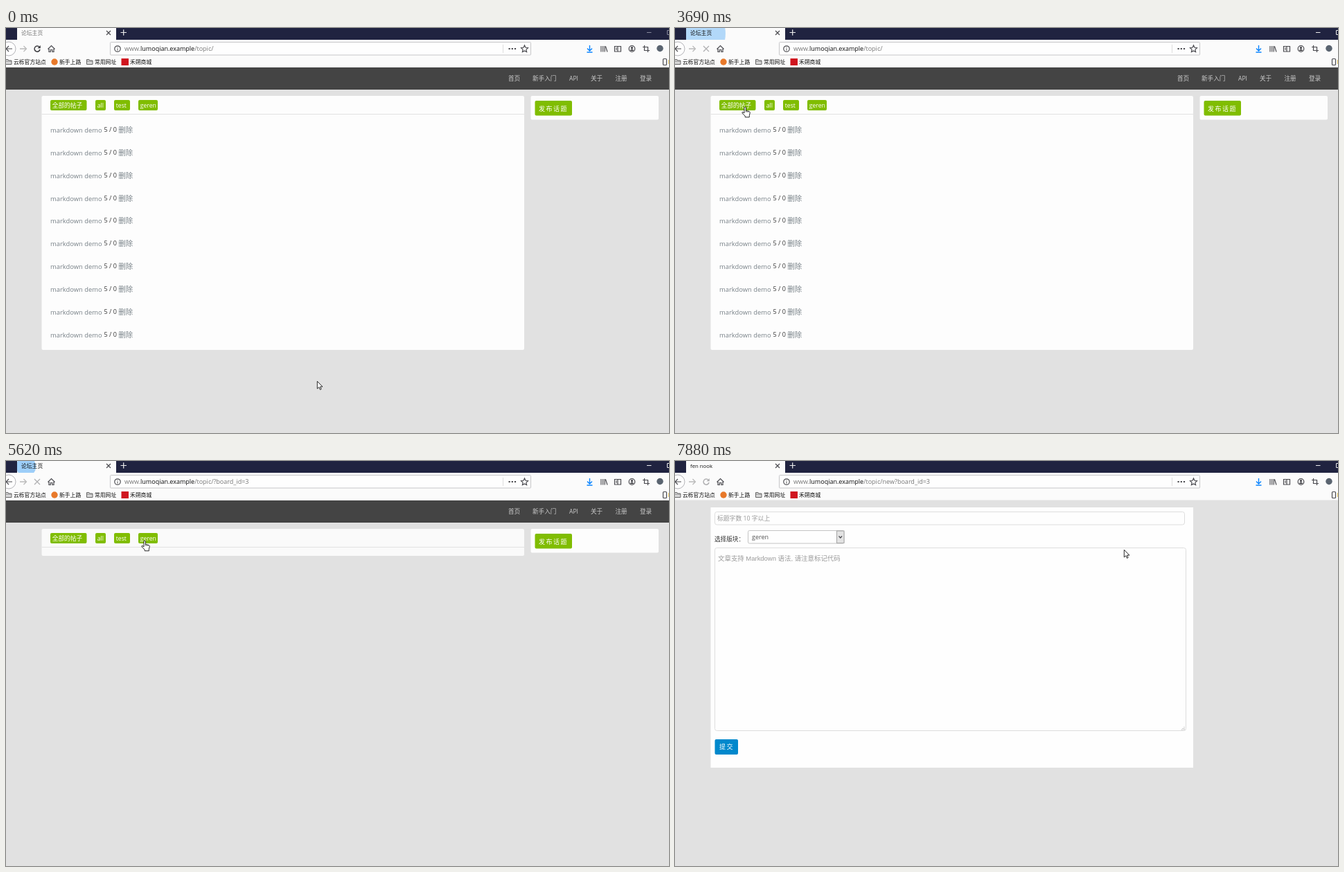
Recreate the animation shown at these times as an HTML page. Size 957 px wide and 585 px high, loop 8 s.

```html
<!DOCTYPE html>
<html lang="zh">
<head>
<meta charset="utf-8">
<title>论坛主页</title>
<style>
html, body { margin: 0; width: 100%; height: 100%; overflow: hidden; background: #e1e1e1; }
svg { display: block; width: 100vw; height: 100vh; }
text { font-family: "Open Sans", "Noto Sans CJK SC", "Noto Sans CJK", sans-serif; white-space: pre; }
.ui { font-size: 7.8px; fill: #111; }
.url { font-size: 9px; fill: #777; }
.url .host { fill: #0c0c0d; }
.nav { font-size: 8.6px; fill: #ccc; }
.tag { font-size: 8.7px; fill: #fff; }
.btn { font-size: 9px; font-weight: 500; fill: #fff; letter-spacing: 1.5px; }
.post { font-size: 9.4px; fill: #778087; }
.post .count { font-size: 9px; fill: #333; }
.post .del { font-size: 10.4px; }
.hint { fill: #999; font-size: 8.8px; }
.area { font-family: "Liberation Sans", "Noto Sans CJK SC", "Noto Sans CJK", sans-serif; font-size: 9.45px; }
.line { fill: none; stroke: #4a4a4f; stroke-width: 1.2; }
.field { fill: #fefefe; stroke: #ddd; }
</style>
</head>
<body>
<svg viewBox="0 0 957 585" preserveAspectRatio="none">
  <defs>
    <clipPath id="tabClip"><rect x="16" width="143" height="17"/></clipPath>
    <g id="folder">
      <path d="M.5 8.5v-7h3.5l1 1.5h4v5.5z" fill="#d8d8d8" stroke="#666"/>
      <path d="M1 4h8" stroke="#777" stroke-width=".8"/>
    </g>
  </defs>

  <rect width="957" height="585" fill="#e1e1e1"/>

  <g id="forum">
    <rect y="57" width="957" height="32" fill="#444"/>
    <g id="nav" class="nav"></g>
    <rect id="panel" x="51.5" y="98" width="696.5" height="367" rx="2" fill="#fdfdfd"/>
    <path d="M51.5 124.5h696.5" stroke="#e2e2e2"/>
    <g id="tags"></g>
    <g id="posts"></g>
    <path id="rulesRight" stroke="#f0f0f0"/>
    <path id="rulesLeft" stroke="#f0f0f0"/>
    <rect x="757.5" y="98" width="184.5" height="34.5" rx="2" fill="#fdfdfd"/>
    <rect id="newTopic" x="763.5" y="105" width="53.5" height="21.5" rx="2"/>
    <text class="btn" x="769" y="119.5">发布话题</text>
  </g>

  <g id="editor">
    <rect x="51.5" y="67" width="696.5" height="376" fill="#fefefe"/>
    <rect class="field" x="57.5" y="73.5" width="678" height="18.5" rx="3"/>
    <text class="hint" x="61" y="86">标题字数 10 字以上</text>
    <text x="57" y="115.5" font-size="8.6" fill="#333">选择版块：</text>
    <rect x="105.5" y="100.5" width="138.5" height="18.5" rx="2" fill="#fefefe" stroke="#c4c4c4"/>
    <text x="111" y="113" font-size="9" fill="#555">geren</text>
    <rect x="233.5" y="101" width="10.5" height="17.5" fill="#e3e3e3" stroke="#a5a5a5"/>
    <path d="M236.5 108.5l2.3 2.5 2.3-2.5" class="line" stroke-width="1"/>
    <rect class="field" x="57.5" y="125.5" width="680" height="264" rx="3"/>
    <text class="hint area" x="62" y="143.5">文章支持 Markdown 语法, 请注意标记代码</text>
    <path d="M735 384v4M733 386v2M731 388h5" stroke="#aaa" stroke-dasharray="1 1"/>
    <rect x="57.5" y="402" width="33.5" height="22" rx="2" fill="#08c"/>
    <text class="btn" x="64" y="416.3">提交</text>
  </g>

  <g id="status">
    <rect y="580" width="158" height="5" fill="#fafafa"/>
    <text x="-9" y="588.5" font-size="8.5" fill="#444">等待 www.lumoqian.example…</text>
  </g>

  <rect width="957" height="17" fill="#202340"/>
  <rect x="16" width="143" height="17" fill="#fbfbfb"/>
  <g clip-path="url(#tabClip)"><circle id="burst" cx="29" cy="8" fill="#9dcef9"/></g>
  <circle id="dot" cy="7" r="1.2" fill="#222"/>
  <text id="title" class="ui" y="9.8"></text>
  <path d="M145 4l6 6m0-6l-6 6" class="line"/>
  <path d="M165.5 6.5h8.5M169.7 2.3v8.5" stroke="#eee" stroke-width="1.2"/>
  <path id="winButtons" d="M925 6.5h6.5M957 3.5h-2.5v6h2.5" fill="none"/>

  <rect y="17" width="957" height="40" fill="#fbfbfb"/>
  <path d="M0 56.5h957" stroke="#eee"/>
  <circle cx="4" cy="30" r="10" fill="#fefefe" stroke="#b4b4b8"/>
  <path d="M9 30H0M4 26l-4 4 4 4" class="line" stroke-width="1.6"/>
  <path d="M20 30h9.5M25.5 26l4 4-4 4" fill="none" stroke="#bbb" stroke-width="1.3"/>
  <path id="stop" d="M41 26l8 8m0-8l-8 8" fill="none" stroke-width="1.3"/>
  <g id="reload">
    <path d="M48.2 27.6A4 4 0 1 0 49 31" fill="none" stroke-width="1.5"/>
    <path d="M49.8 25v4.3h-4.3z" stroke="none"/>
  </g>
  <path d="M60.5 30.5l5-5 5 5M62 30v4.5h2.3v-3h2.5v3H69V30" class="line" stroke-width="1.4"/>
  <rect x="150.5" y="20.5" width="607" height="18.5" rx="1" fill="#fefefe" stroke="#c6c6c8"/>
  <circle cx="161" cy="30" r="4.2" class="line" stroke-width=".9"/>
  <path d="M161 29.5v3M161 27.5v1" stroke="#555"/>
  <text class="url" x="171" y="33.2">www.<tspan class="host">lumoqian.example</tspan><tspan id="path"></tspan></text>
  <path d="M717.5 24v12" stroke="#ddd"/>
  <path d="M725.5 30h2.2m2 0h2.2m2 0h2.2" stroke="#4a4a4f" stroke-width="2.2"/>
  <path d="M748.500 25l1.500 3.300 3.500.4-2.600 2.400.7 3.500-3.100-1.700-3.100 1.700.7-3.500-2.600-2.400 3.500-.4z" class="line" stroke-width="1"/>

  <path d="M842.500 25v7M839 29.500l3.500 3.500 3.500-3.500M838.500 35h8" fill="none" stroke="#0a84ff" stroke-width="1.400"/>
  <path d="M859 26v8.500M861.700 26v8.500M864.300 26v8.500M865.500 26.500l2.500 8" class="line"/>
  <path d="M878.500 26.500h9v7.500h-9zM883 26.500v7.500M880 29h2M880 31h2" class="line"/>
  <circle cx="903.500" cy="30" r="4.300" class="line" stroke-width="1"/>
  <path d="M901 33a2.500 2.300 0 0 1 5 0z" fill="#4a4a4f"/><circle cx="903.500" cy="28.700" r="1.700" fill="#4a4a4f"/>
  <path d="M921.500 25v7.500h7.500M919 27.500h7.500V35" class="line" stroke-width="1.500"/>
  <circle cx="944" cy="29.500" r="4.700" fill="#5a6470"/>

  <use href="#folder" x="-1" y="44"/>
  <use href="#folder" x="116" y="44"/>
  <circle cx="70" cy="49" r="4.700" fill="#e8792a"/>
  <rect x="166.500" y="44" width="10.500" height="10" fill="#d0151f"/>
  <g id="marks" class="ui"></g>
  <rect x="948.500" y="44.500" width="5" height="9" rx="1" class="line" stroke-width="1"/>
  <path d="M956.500 46v6" stroke="#e8c860"/>

  <g id="cursor" stroke="#111" stroke-width=".9" stroke-linejoin="round" fill="#fff">
    <path id="arrow" d="M.3.3v10.700l2.500-2.200 1.600 3.600 1.700-.8-1.600-3.500h3.400z"/>
    <g id="hand">
      <path d="M-1 1.300a1.200 1.200 0 0 1 2.400 0v4.200l1.800.3 1.800.4 1.500.6q.9.600.7 2l-.9 3.700v2.300H.2v-1.700L-3.800 9q-.9-1.400.5-1.700l2.300 1.500z"/>
      <path d="M1.400 5.500v2M3.200 5.800v2M5 6.200v1.600" stroke-width=".6"/>
    </g>
  </g>
</svg>

<script>
const $ = id => document.getElementById(id);
const LOOP = 8000;
const FRAME = 134;

const label = (cls, x, y, s) => `<text class="${cls}" x="${x}" y="${y}">${s}</text>`;
const show = (id, on) => { $(id).style.display = on ? '' : 'none'; };

const tags = [['全部的帖子', 64, 52.5], ['all', 129, 15], ['test', 156, 23], ['geren', 191, 28]];
$('tags').innerHTML = tags.map(([s, x, w]) =>
  `<rect x="${x}" y="104" width="${w}" height="15" rx="2" fill="#80bd01"/>` + label('tag', x + 2.7, 115, s)).join('');

$('nav').innerHTML = [['首页', 725], ['新手入门', 760], ['API', 813], ['关于', 844], ['注册', 879.5], ['登录', 915]]
  .map(([s, x]) => label('nav', x, 76.3, s)).join('');

$('marks').innerHTML = [['云栎官方站点', 11], ['新手上路', 77], ['常用网址', 128], ['禾朔商城', 179]]
  .map(([s, x]) => label('ui', x, 52, s)).join('');

const rowY = i => 147 + i * 32.85;
$('posts').innerHTML = Array.from({ length: 10 }, (_, i) => {
  const y = rowY(i);
  return label('post', 64, y + 4, 'markdown demo') +
    `<g class="post"><text class="count" x="141.500" y="${y + 3}">5 / 0</text>` +
    `<text class="del" x="162.300" y="${y + 4}">删除</text></g>`;
}).join('');

const rules = (from, to, x, w) => {
  let d = '';
  for (let i = from; i < to; i++) d += `M${x} ${Math.floor(rowY(i) + 16) + .5}h${w}`;
  return d;
};
$('rulesLeft').setAttribute('d', rules(0, 5, 184, 61));
$('rulesRight').setAttribute('d', rules(5, 9, 238, 102));

// Pointer runs: start time, then one position per frame step
const runs = [
  [0, [449, 510]],
  [280, [415, 455], [332, 415], [238, 303], [180, 153], [166, 136], [160, 129], [157, 125], [156, 124]],
  [1340, [144, 115], [136, 111]],
  [2430, [132, 111], [122, 112], [110, 113], [101, 114]],
  [3820, [112, 115], [136, 117], [154, 118], [161, 117]],
  [4760, [166, 117], [180, 116], [194, 115], [200, 115]],
  [5750, [222, 118], [305, 122], [440, 127], [590, 130], [710, 131], [780, 131], [797, 131]],
  [6710, [789, 115]],
  [7760, [747, 128]],
  [7880, [648, 128]]
];

function pointer(t) {
  const [start, ...steps] = runs.filter(r => r[0] <= t).pop();
  return steps[Math.min(steps.length - 1, Math.floor((t - start + 1) / FRAME))];
}

// Page loads: request, address change, paint, length of the tab burst
const home = '论坛主页';
const loads = [
  { start: -2000, commit: -2000, paint: -2000, fade: 560, path: '/topic/', title: home, rows: true },
  { start: 1900, commit: 2170, paint: 2310, fade: 560, path: '/topic/?board_id=1', title: home, rows: true },
  { start: 2990, commit: 3390, paint: 3390, fade: 560, path: '/topic/', title: home, rows: true },
  { start: 4350, commit: 4500, paint: 4500, fade: 560, path: '/topic/?board_id=2', title: home },
  { start: 5470, commit: 5620, paint: 5620, fade: 560, path: '/topic/?board_id=3', title: home },
  { start: 6840, commit: 7240, paint: 7370, fade: 260, path: '/topic/new?board_id=3', title: 'fen nook', form: true }
];
const last = (key, t) => loads.filter(l => l[key] <= t).pop();

function render(t) {
  const page = last('paint', t);
  const address = last('commit', t);
  const loading = last('start', t) !== page;
  const age = t - page.paint;
  const focused = t >= 1900;

  show('forum', !page.form);
  show('editor', page.form);
  show('posts', page.rows);
  $('panel').setAttribute('height', page.rows ? 367 : 39);
  $('panel').setAttribute('fill', page.rows ? '#fdfdfd' : '#fafafa');
  show('rulesRight', t >= 548 && t < 2310);
  show('rulesLeft', t >= 682 && t < 2310);
  $('newTopic').setAttribute('fill', t >= 6710 ? '#62a04c' : '#80bd01');
  show('status', loading);

  $('path').textContent = address.path;
  $('title').textContent = address.title;
  $('title').setAttribute('x', loading ? 36 : 22);
  $('title').style.fill = focused ? '#111' : '#777';
  $('winButtons').setAttribute('stroke', focused ? '#eee' : '#888a9c');

  show('dot', loading);
  $('dot').setAttribute('cx', 26.5 + 4 * Math.cos((t - 7240) / 190));
  show('burst', !loading && age < page.fade);
  $('burst').setAttribute('r', 14 + 32 * (1 - Math.exp(-Math.max(age, 0) / 110)));
  $('burst').setAttribute('opacity', Math.min(1, Math.max(0, 1 - (age - 140) / 700)));

  const stopping = loading || age < 380;
  const tone = loading || age >= 650 ? '#3c3c40' : '#b0b0b2';
  show('stop', stopping);
  show('reload', !stopping);
  $('stop').setAttribute('stroke', tone);
  $('reload').setAttribute('stroke', tone);
  $('reload').setAttribute('fill', tone);

  const [x, y] = pointer(t);
  const onTag = !page.form && y >= 104 && y <= 119 && tags.some(([, left, w]) => x >= left && x <= left + w);
  $('cursor').setAttribute('transform', `translate(${x} ${y})`);
  show('hand', onTag);
  show('arrow', !onTag);
}

const begin = performance.now();
function tick() {
  render((performance.now() - begin) % LOOP);
  requestAnimationFrame(tick);
}
tick();
</script>
</body>
</html>
```
